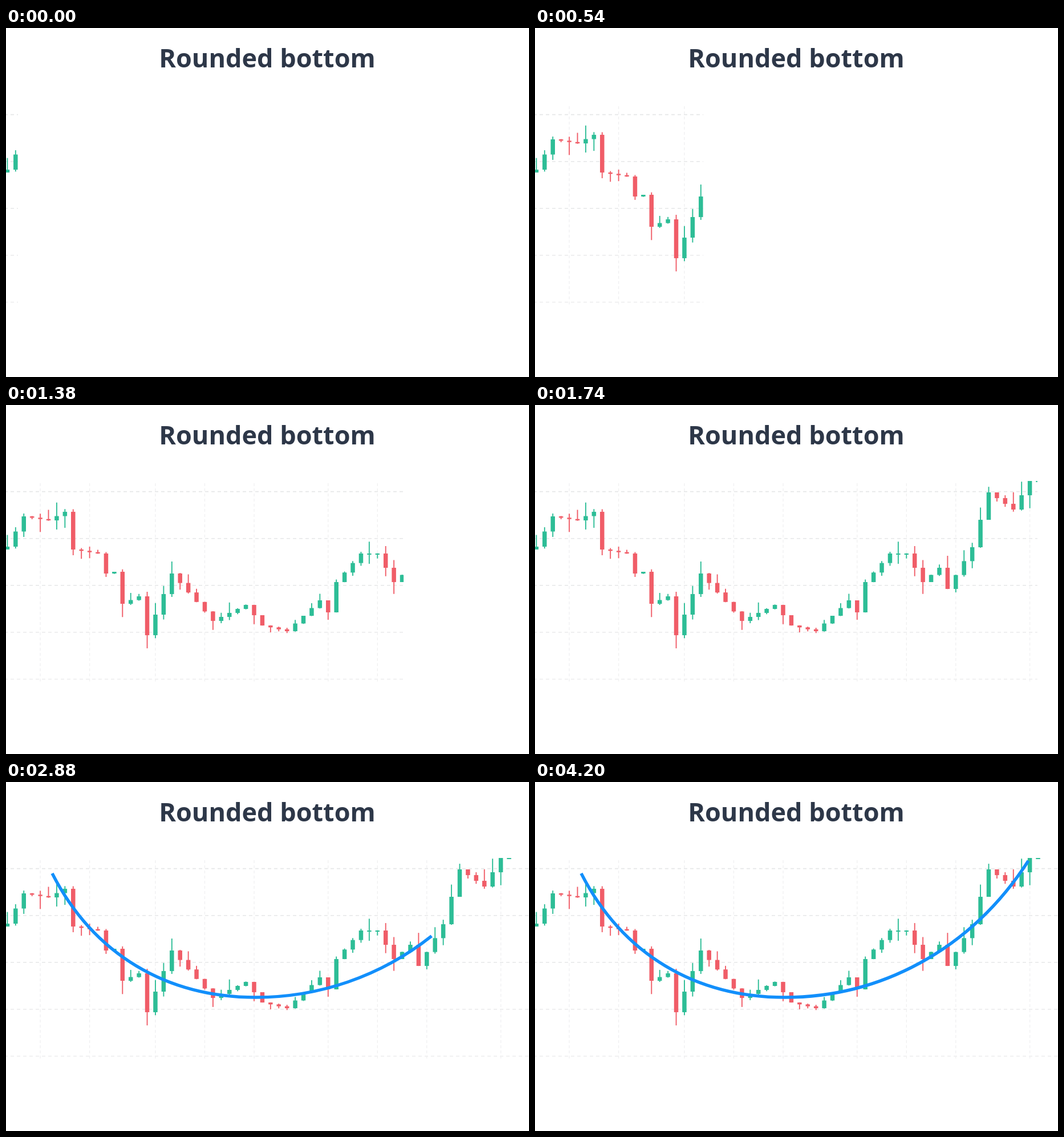
Animation of 917x611 px, one loop 4.26 s. Source, as an HTML page with a canvas:

```html
<!DOCTYPE html>
<html lang="en">
<head>
<meta charset="utf-8">
<title>Rounded bottom</title>
<style>
  html, body { margin: 0; width: 100%; height: 100%; overflow: hidden; background: #fff; }
  canvas, svg { position: absolute; left: 0; top: 0; width: 917px; height: 611px; }
  text { font: 700 45px "Open Sans", "Noto Sans", sans-serif; fill: #2d3748; text-anchor: middle; }
</style>
</head>
<body>
<canvas id="chart" width="917" height="611"></canvas>
<svg viewBox="0 0 917 611"><text x="458" y="69">Rounded bottom</text></svg>
<script>
const W = 917, H = 611, TOP = 133, LOOP = 4260, STEP = 60, COUNT = 62;
const GREEN = '#2dbd96', RED = '#f05d68', BLUE = '#128ffb';
const ctx = document.getElementById('chart').getContext('2d');

// Turning points of the price: [candle, closing height]
const turns = [
  [-1, 253], [0, 248], [2, 195], [5, 202], [7, 187], [8, 253], [11, 260], [12, 295], [13, 292],
  [14, 348], [16, 335], [17, 403], [20, 295], [25, 378], [29, 350], [31, 386], [34, 396],
  [38, 342], [39, 363], [40, 310], [43, 260], [45, 260], [47, 310], [49, 285], [50, 322],
  [53, 249], [55, 153], [58, 183], [60, 133], [COUNT, 133]
];
const columns = [4, 10, 18, 24, 30, 39, 45, 51, 60];
const arcs = [
  [81, 160, 154, 303, 283, 377, 438, 377],
  [438, 377, 603, 377, 763, 296, 865, 138]
];

const candleX = i => 2.4 + 14.42 * i;

function random(n) {
  const v = Math.sin(n * 12.9898) * 43758.5453;
  return v - Math.floor(v);
}

function closeAt(i) {
  const k = turns.findIndex(p => p[0] > i);
  const [i0, y0] = turns[k - 1], [i1, y1] = turns[k];
  return y0 + (y1 - y0) * (i - i0) / (i1 - i0);
}

// Each candle opens at the previous close; wicks are mostly short
const wick = n => 24 * random(n) ** 2;
const candles = Array.from({ length: COUNT }, (_, i) => {
  const open = closeAt(i - 1), close = closeAt(i);
  const top = Math.min(open, close), bottom = Math.max(open, close, top + 2);
  return {
    x: candleX(i), top, bottom,
    high: top - wick(2 * i + 1),
    low: bottom + wick(2 * i + 2),
    color: close <= open ? GREEN : RED
  };
});

const bez = (a, b, c, d, s) => {
  const r = 1 - s;
  return r * r * r * a + 3 * r * r * s * b + 3 * r * s * s * c + s * s * s * d;
};

function arcLength([x0, y0, x1, y1, x2, y2, x3, y3]) {
  let sum = 0, px = x0, py = y0;
  for (let i = 1; i <= 200; i++) {
    const x = bez(x0, x1, x2, x3, i / 200), y = bez(y0, y1, y2, y3, i / 200);
    sum += Math.hypot(x - px, y - py);
    px = x;
    py = y;
  }
  return sum;
}
const total = arcLength(arcs[0]) + arcLength(arcs[1]);

// Cubic-bezier(.307, 0, .367, 1)
function ease(u) {
  if (u <= 0) return 0;
  if (u >= 1) return 1;
  let lo = 0, hi = 1;
  for (let i = 0; i < 24; i++) {
    const mid = (lo + hi) / 2;
    if (bez(0, .307, .367, 1, mid) < u) lo = mid; else hi = mid;
  }
  return bez(0, 0, 1, 1, lo);
}

// The reveal runs a little faster at both ends
const wipeEdge = t =>
  t < 1800 ? Math.min(W, 21 + .495 * t + 7 * Math.sin(2 * Math.PI * t / 1800)) : W;

function line(x0, y0, x1, y1, color, width) {
  ctx.strokeStyle = color;
  ctx.lineWidth = width;
  ctx.beginPath();
  ctx.moveTo(x0, y0);
  ctx.lineTo(x1, y1);
  ctx.stroke();
}

function drawGrid() {
  ctx.setLineDash([6, 5]);
  for (let i = 0; i < 5; i++) {
    const y = 151.6 + 82.1 * i;
    line(-3, y, W, y, i < 3 ? '#e6e7e8' : '#ededee', 1.6);
  }
  ctx.setLineDash([5, 4]);
  columns.forEach(i => line(candleX(i), 137, candleX(i), 484, '#f0f0f1', 1.3));
  ctx.setLineDash([]);
}

function drawCandle({ x, top, bottom, high, low, color }) {
  line(x, high, x, low, color, 1.9);
  ctx.fillStyle = color;
  ctx.fillRect(x - 3.75, top, 7.5, bottom - top);
}

function drawCurve(p) {
  if (p <= 0) return;
  ctx.strokeStyle = BLUE;
  ctx.lineWidth = 5.5;
  ctx.setLineDash(p < 1 ? [total * p, total * 2] : []);
  ctx.beginPath();
  ctx.moveTo(arcs[0][0], arcs[0][1]);
  arcs.forEach(a => ctx.bezierCurveTo(...a.slice(2)));
  ctx.stroke();
  ctx.setLineDash([]);
}

function draw(t) {
  ctx.clearRect(0, 0, W, H);
  ctx.save();
  ctx.beginPath();
  ctx.rect(0, TOP, wipeEdge(t), H - TOP);
  ctx.clip();
  drawGrid();
  candles.forEach(drawCandle);
  ctx.restore();
  drawCurve(ease((t - 2102) / 1321));
}

const start = performance.now();
function tick() {
  const t = (performance.now() - start + 12) % LOOP;
  draw(Math.floor(t / STEP) * STEP);
  requestAnimationFrame(tick);
}
tick();
</script>
</body>
</html>
```
